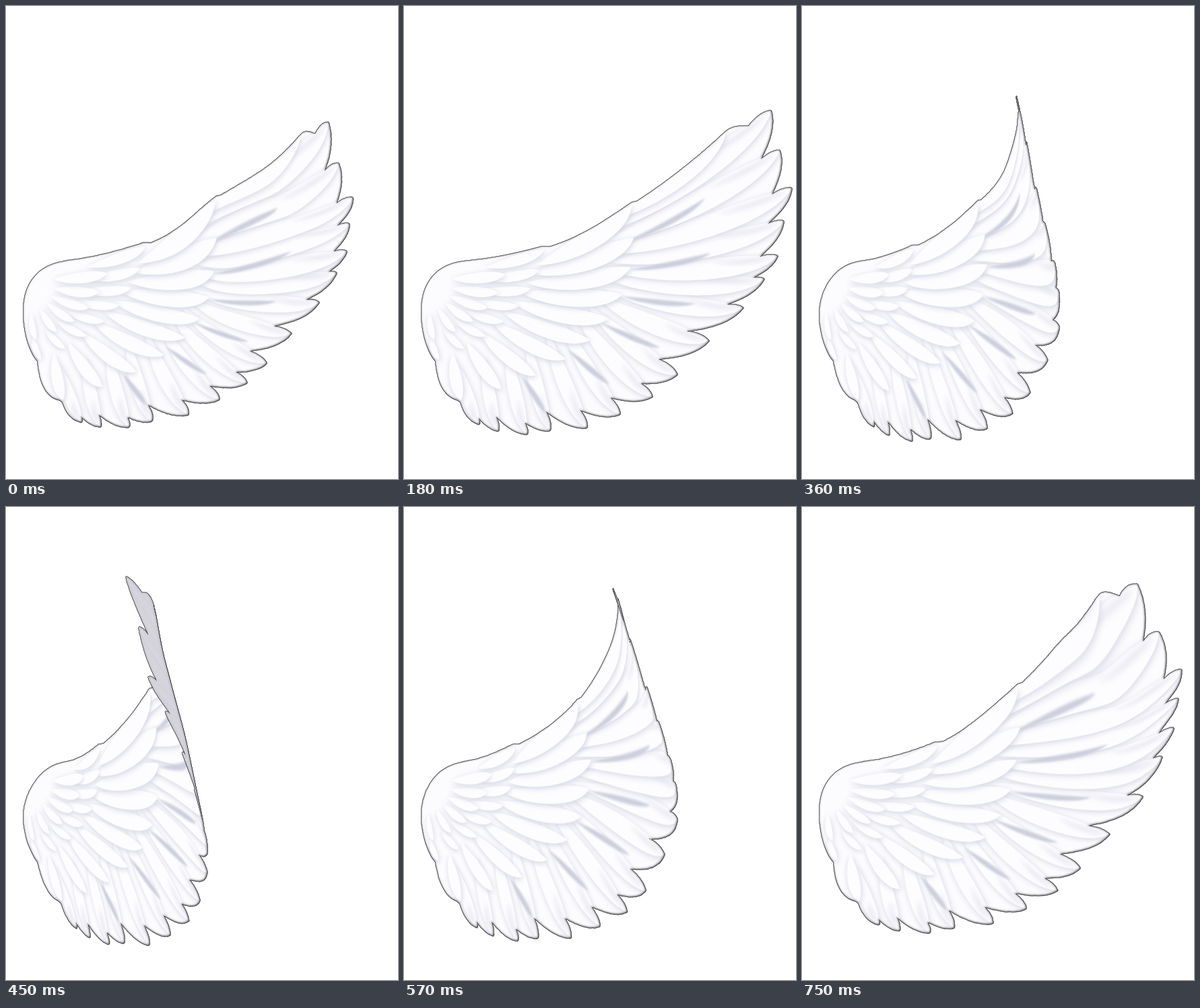
These frames come from a looping animation (582 px wide and 702 px high, 0.78 s). An HTML page with a canvas:

```html
<!DOCTYPE html>
<html lang="en">
<head>
<meta charset="utf-8">
<title>Wing</title>
<style>
html, body { margin: 0; width: 100%; height: 100%; overflow: hidden; background: #fff; }
canvas { display: block; }
</style>
</head>
<body>
<canvas id="stage" width="582" height="702"></canvas>
<script>
const W = 582, H = 702, LOOP = 780, STEP = 30, CELL = 10;
const mix = (a, b, t) => a + (b - a) * t;

// Each pin: its place in the open, drooped, half folded, folded and lifted wing
const pins = [];
const pin = (...v) => pins.push(v);
pin(215,358, 213,353, 170,353, 143,353, 207,350); // wrist
pin(338,292, 312,283, 257,287, 213,270, 320,264); // leading edge
pin(410,243, 382,242, 304,212, 222,242, 386,196);
pin(478,186, 438,191, 318,142, 217,139, 441,131); // feather tips
pin(545,155, 479,173, 310,120, 178,104, 498,115);
pin(576,270, 515,284, 361,268, 211,253, 563,241);
pin(555,371, 506,364, 396,375, 262,366, 552,328);
pin(504,448, 465,440, 406,463, 297,490, 506,430);
pin(406,547, 387,530, 359,569, 288,584, 413,536);
pin(321,606, 317,584, 291,622, 244,635, 333,596);
pin(183,636, 183,625, 169,644, 153,649, 190,632);
pin(465,272, 415,292, 335,262, 241,250, 452,266); // inside
pin(475,340, 440,340, 368,325, 264,335, 475,325);
pin(340,388, 312,394, 281,375, 229,382, 322,376);
for (const [x, y] of [[82, 378], [26, 455], [48, 527], [78, 585]]) pin(x, y, x, y, x, y, x, y, x, y);

// How far each pose leans from open to the other four shapes
const poses = [
  { at: 0, droop: 1 }, { at: 180 }, { at: 300, half: .55, lift: -.4 }, { at: 450, fold: 1 },
  { at: 570, half: 1 }, { at: 660, half: .5, lift: .5 }, { at: 750, lift: 1 }];
const times = poses.map(p => p.at);
const placed = (p, axis) => poses.map(q => ['droop', 'half', 'fold', 'lift']
  .reduce((s, name, i) => s + (q[name] || 0) * (p[2 * i + 2 + axis] - p[axis]), p[axis]));
const tracks = pins.map(p => [placed(p, 0), placed(p, 1)]);

// Monotone cubic through the poses
function follow(v, t) {
  const n = times.length;
  let i = 0;
  while (i < n - 2 && t >= times[i + 1]) i++;
  const slope = k => (v[k + 1] - v[k]) / (times[k + 1] - times[k]);
  const tangent = k => {
    if (k === 0) return slope(0);
    if (k === n - 1) return slope(n - 2);
    const a = slope(k - 1), b = slope(k);
    return a * b <= 0 ? 0 : 2 * a * b / (a + b);
  };
  const h = times[i + 1] - times[i], s = Math.min(1, (t - times[i]) / h), r = 1 - s;
  return v[i] * (1 + 2 * s) * r * r + v[i + 1] * s * s * (3 - 2 * s)
    + h * (tangent(i) * s * r * r - tangent(i + 1) * s * s * r);
}

function sheet() {
  const c = document.createElement('canvas');
  c.width = W; c.height = H;
  return c.getContext('2d', { willReadFrequently: true });
}

const curve = (...c) => t => [0, 1].map(k =>
  mix(mix(c[k], c[k + 2], t), mix(c[k + 2], c[k + 4], t), t));

// Flight feathers fan out from the arm to these tips
const tips = [[478,186], [545,155], [558,214], [576,270], [564,319], [555,371], [535,405], [504,448], [453,497],
  [406,547], [369,580], [321,606], [272,626], [217,630], [183,636], [140,631], [112,621]];
const arm = curve(260, 330, 400, 430, 80, 530);
const rootOf = k => arm(k / (tips.length - 1));

function wingOutline() {
  let d = `M84 588L80 585Q60 580 52 555Q48 540 47 527C36 515 25 485 26 450C27 410 48 384 88 379
    C130 375 165 368 205 357L218 357C265 342 300 318 338 292L346 290C390 262 440 222 ${tips[0]}`;
  const bow = (a, b, s) => {
    const dx = b[0] - a[0], dy = b[1] - a[1];
    d += `Q${a[0] + dx * s + dy * .2} ${a[1] + dy * s - dx * .2} ${b}`;
  };
  for (let k = 1; k < tips.length; k++) {
    const last = tips[k - 1], tip = tips[k], root = rootOf(k);
    const gap = Math.hypot(tip[0] - last[0], tip[1] - last[1]);
    const back = .55 * gap / Math.hypot(tip[0] - root[0], tip[1] - root[1]);
    const notch = [0, 1].map(i => mix(tip[i], root[i], back));
    bow(last, notch, .35);
    bow(notch, tip, .65);
  }
  return new Path2D(d + 'Q92 616 84 588Z');
}
const outline = wingOutline();

// Feather shape from root to tip, bent sideways
function leaf([x, y], [X, Y], bend, w) {
  const dx = X - x, dy = Y - y, d = Math.hypot(dx, dy);
  const p = (t, o) => `${x + dx * t - dy / d * o} ${y + dy * t + dx / d * o} `;
  return new Path2D(`M${p(0, 0)}C${p(.3, bend + w * .8)}${p(.85, bend + w)}${p(1, 0)}
    C${p(.8, bend - w)}${p(.3, bend - w * .8)}${p(0, 0)}Z`);
}

function paintWing() {
  const g = sheet();
  const feather = (a, b, bend, w, dark) => {
    g.shadowColor = dark;
    g.shadowBlur = 8;
    g.shadowOffsetX = 1;
    g.shadowOffsetY = 2;
    g.fillStyle = '#fdfdff';
    g.fill(leaf(a, b, bend, w));
    g.shadowColor = 'transparent';
  };
  const row = (n, roots, ends, bend, w, dark) => {
    for (let i = n - 1; i >= 0; i--) {
      const t = i / (n - 1);
      feather(roots(t), ends(t), mix(bend, 3, t), mix(w, w * .6, t), dark);
    }
  };
  const soft = (shape, color, blur) => {
    g.filter = `blur(${blur}px)`;
    g.fillStyle = color;
    g.fill(shape);
    g.filter = 'none';
  };
  g.fillStyle = '#fcfcfe';
  g.fill(outline);

  for (let k = tips.length - 1; k >= 0; k--) {
    const t = k / (tips.length - 1), a = rootOf(k), b = tips[k];
    const along = s => [mix(a[0], b[0], s), mix(a[1], b[1], s)];
    feather(a, b, mix(19, 3, t), mix(27, 13, t), '#d4d5e2');
    soft(leaf(along(.6), along(.97), 5, 5), 'rgba(208,209,224,.45)', 3);
  }

  // dark gaps where the coverts end
  const gapStart = curve(324, 352, 370, 450, 175, 549);
  for (let i = 0; i < 6; i++) {
    const t = i / 5, turn = mix(-.5, 1, t), len = mix(140, 65, t), [x, y] = gapStart(t);
    soft(leaf([x, y], [x + len * Math.cos(turn), y + len * Math.sin(turn)], mix(8, 0, t), 6), '#cdcfdc', 1.5);
  }

  row(10, curve(195, 385, 170, 440, 72, 515), curve(338, 296, 370, 520, 85, 585), 14, 22, '#cfd1df');
  row(8, curve(120, 388, 110, 450, 40, 490), curve(208, 362, 190, 470, 52, 525), 5, 12, '#cfd1df');
  row(6, curve(70, 405, 75, 440, 38, 455), curve(150, 398, 130, 470, 45, 495), 3, 12, '#d4d5e2');

  g.globalCompositeOperation = 'destination-in';
  g.fillStyle = '#000';
  g.fill(outline);
  g.globalCompositeOperation = 'source-over';
  return g;
}

function solve(m, cols) {
  const n = m.length;
  for (let c = 0; c < n; c++) {
    let p = c;
    for (let r = c + 1; r < n; r++) if (Math.abs(m[r][c]) > Math.abs(m[p][c])) p = r;
    [m[c], m[p]] = [m[p], m[c]];
    for (let r = 0; r < n; r++) {
      if (r === c) continue;
      const k = m[r][c] / m[c][c];
      if (k) for (let j = c; j < n + cols; j++) m[r][j] -= k * m[c][j];
    }
  }
  return m.map((line, i) => line.slice(n).map(v => v / line[i]));
}

// Thin-plate warp from the open wing to the wing at time t
const home = pins.map(p => [p[0] / 100, p[1] / 100]);
const bump = (a, b) => {
  const q = (a[0] - b[0]) ** 2 + (a[1] - b[1]) ** 2;
  return q ? q * Math.log(q) : 0;
};
function warpAt(t) {
  const rows = home.map((p, i) => [
    ...home.map(q => bump(p, q)), 1, ...p, follow(tracks[i][0], t), follow(tracks[i][1], t)]);
  [() => 1, p => p[0], p => p[1]].forEach(f => rows.push([...home.map(f), 0, 0, 0, 0, 0]));
  const w = solve(rows, 2), n = home.length;
  return (x, y) => {
    const p = [x / 100, y / 100];
    return [0, 1].map(k => home.reduce((s, q, i) => s + w[i][k] * bump(p, q),
      w[n][k] + w[n + 1][k] * p[0] + w[n + 2][k] * p[1]));
  };
}

const wing = paintWing();
const cells = [];
wing.lineWidth = 22;
for (let y = 140; y < 650; y += CELL)
  for (let x = 10; x < W; x += CELL) {
    const cx = x + CELL / 2, cy = y + CELL / 2;
    if (wing.isPointInPath(outline, cx, cy) || wing.isPointInStroke(outline, cx, cy)) cells.push([x, y]);
  }

// Half a cell; a is its square corner, s the side it opens to
function triangle(g, x, y, s, a, b, c) {
  const mx = (a[0] + b[0] + c[0]) / 3, my = (a[1] + b[1] + c[1]) / 3;
  g.save();
  g.beginPath();
  for (const p of [a, b, c]) {
    const dx = p[0] - mx, dy = p[1] - my, k = 1 + .9 / (Math.hypot(dx, dy) || 1);
    g.lineTo(mx + dx * k, my + dy * k);
  }
  g.clip();
  const k = s * CELL;
  const ux = (b[0] - a[0]) / k, uy = (b[1] - a[1]) / k, vx = (c[0] - a[0]) / k, vy = (c[1] - a[1]) / k;
  g.setTransform(ux, uy, vx, vy, a[0] - ux * x - vx * y, a[1] - uy * x - vy * y);
  const l = Math.min(x, x + k) - 5, t = Math.min(y, y + k) - 5, d = CELL + 10;
  g.drawImage(wing.canvas, l, t, d, d, l, t, d, d);
  g.restore();
}

function flood(g, color, mode) {
  g.globalCompositeOperation = mode;
  g.fillStyle = color;
  g.fillRect(0, 0, W, H);
}

// Solid edges, soft inner rim and thin dark line
function finish(g, tint) {
  for (let i = 0; i < 3; i++) g.drawImage(g.canvas, 0, 0);
  const line = sheet(), rim = sheet();
  line.drawImage(g.canvas, 0, 0);
  flood(line, '#2c2c2e', 'source-in');
  flood(rim, '#3c3c40', 'source-over');
  rim.globalCompositeOperation = 'destination-out';
  rim.drawImage(g.canvas, 0, 0);
  if (tint) flood(g, tint, 'source-atop');
  g.globalCompositeOperation = 'source-atop';
  g.filter = 'blur(1.8px)';
  g.globalAlpha = tint ? .4 : 1;
  g.drawImage(rim.canvas, -.6, -.6);
  g.filter = 'none';
  g.globalAlpha = 1;
  g.globalCompositeOperation = 'destination-over';
  for (const [x, y] of [[.7, 0], [-.7, 0], [0, .7], [0, -.7]]) g.drawImage(line.canvas, x, y);
}

function render(t) {
  const warp = warpAt(t), front = sheet(), back = sheet(), seen = new Map();
  const node = (x, y) => {
    const k = x * 1000 + y;
    if (!seen.has(k)) seen.set(k, warp(x, y));
    return seen.get(k);
  };
  let folded = false;
  const put = (x, y, s) => {
    const a = node(x, y), b = node(x + s * CELL, y), c = node(x, y + s * CELL);
    const area = (b[0] - a[0]) * (c[1] - a[1]) - (b[1] - a[1]) * (c[0] - a[0]);
    if (Math.abs(area) < .02) return;
    if (area < 0) folded = true;
    triangle(area < 0 ? back : front, x, y, s, a, b, c);
  };
  for (const [x, y] of cells) {
    put(x, y, 1);
    put(x + CELL, y + CELL, -1);
  }
  finish(front);
  if (folded) {
    finish(back, 'rgba(205,204,212,.8)');
    front.globalCompositeOperation = 'source-over';
    front.drawImage(back.canvas, 0, 0);
  }
  return front.canvas;
}

const frames = Array.from({ length: LOOP / STEP }, (_, i) => render(i * STEP));
const stage = document.getElementById('stage').getContext('2d');
const start = performance.now();

function draw() {
  const t = (performance.now() - start) % LOOP;
  stage.fillStyle = '#fff';
  stage.fillRect(0, 0, W, H);
  stage.drawImage(frames[Math.floor(t / STEP)], 0, 0);
  requestAnimationFrame(draw);
}
draw();
</script>
</body>
</html>
```
